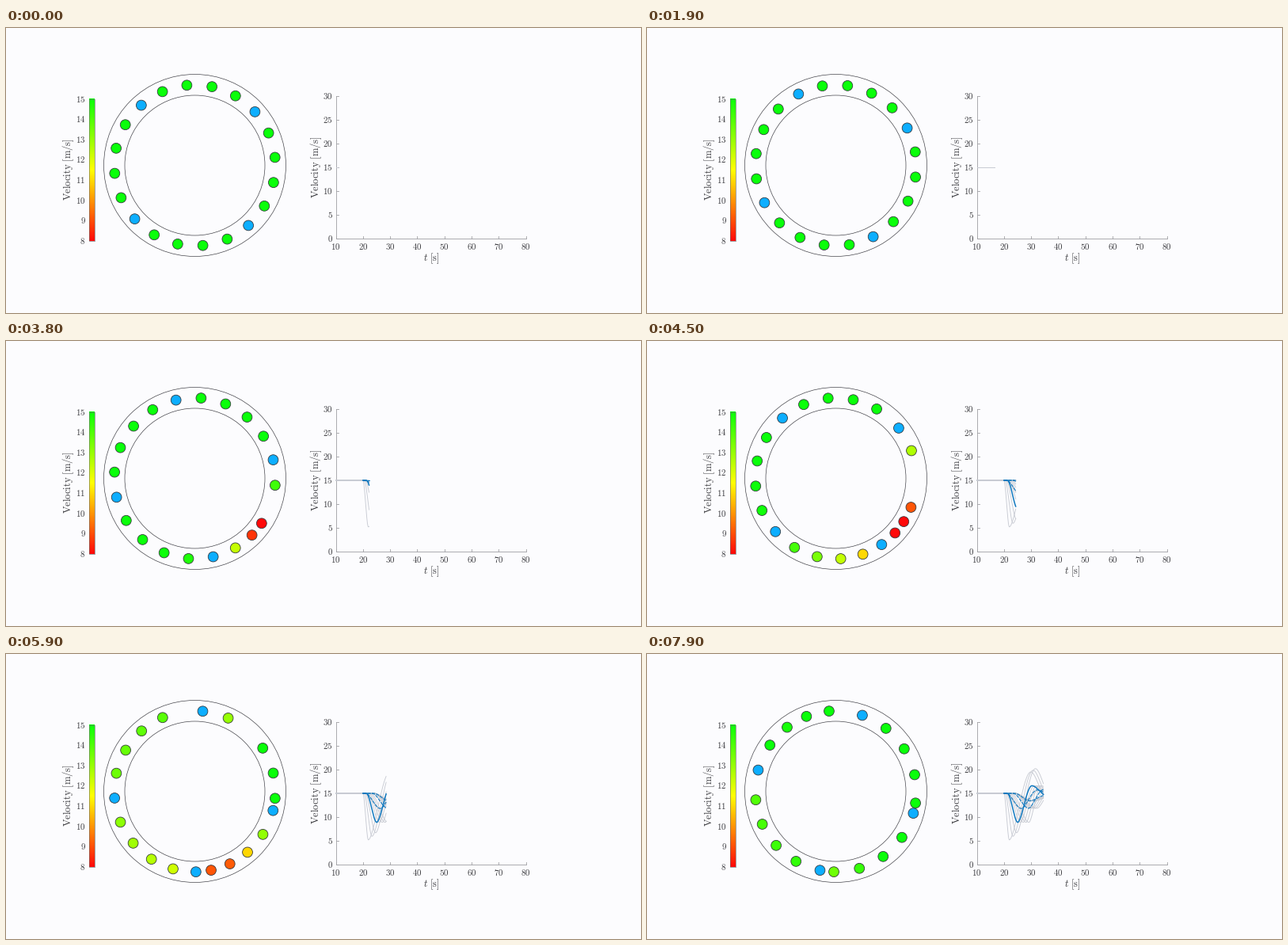
Animation of 802 by 360 pixels, one loop 8 s. Source, as a matplotlib script:

```python
import numpy as np
import matplotlib.pyplot as plt
from matplotlib.animation import FuncAnimation
from matplotlib.colors import LinearSegmentedColormap, Normalize
from matplotlib.patches import Circle, Rectangle

plt.rcParams["mathtext.fontset"] = "cm"

W, H, PX = 802, 360, 0.72          # PX: points per pixel at 100 dpi
FRAMES, STEP_MS = 80, 100
T_START, T_STEP, T_BRAKE = 10.9, 0.3, 20
N_CARS, GAP, CRUISE = 20, 18, 15.0
START_ANGLE, DEG_PER_M = -174.3, 13.32 / CRUISE
CX, CY, LANE = 238.5, 173.5, 101.7

INK, RING, AXIS = "#3c3c40", "#46464c", "#a4a4a8"
BLUE, BLUE_LINE, HUMAN_LINE = "#0daeff", "#0f78bf", "#c8cbd3"

# The wave loses strength at every robot, so each platoon shares one shape.
# first car: dip time, delay per car, dip speed, peak time, peak speed
PLATOONS = {
    -2: (26.4, 0.0, 11.8, 32.3, 15.7),
    0: (22.0, 1.35, 5.2, 29.9, 19.5),
    3: (25.1, 1.03, 8.9, 30.3, 16.6),
    8: (29.1, 0.77, 11.85, 34.6, 15.8),
    13: (29.5, 0.4, 13.4, 36.0, 14.7),
}
ROBOTS = (-2, 3, 8, 13)
CARS = range(-2, N_CARS - 2)       # car 0 brakes, positive numbers follow it

DT = 0.05
TIME = np.arange(10, 35, DT)


def ease(s):
    return s * s * (3 - 2 * s)


def speed(n):
    first = max(k for k in PLATOONS if k <= n)
    j = n - first
    dip_t, delay, dip, peak_t, peak = PLATOONS[first]
    if first == 0:                 # before any robot the extremes still shift
        dip, peak = dip + 0.75 * j, peak + 0.35 * j
    dip_t, peak_t = dip_t + delay * j, peak_t + 0.85 * j
    onset = min(T_BRAKE + 0.42 * abs(n), 24)

    def phase(a, b):
        return np.clip((TIME - a) / (b - a), 0, 1)

    fall = ease(phase(onset, dip_t))
    rise = ease(phase(dip_t, peak_t) ** 0.9)
    settle = ease(phase(peak_t, peak_t + 5.5))
    return CRUISE + (dip - CRUISE) * fall + (peak - dip) * rise + (14.5 - peak) * settle


speeds = {n: speed(n) for n in CARS}
angles = {}
for n in CARS:
    run = np.cumsum(speeds[n]) * DT * DEG_PER_M
    angles[n] = START_ANGLE - GAP * n + run - np.interp(T_START, TIME, run)


def car_xy(n, t):
    a = np.radians(np.interp(t, TIME, angles[n]))
    return CX + LANE * np.cos(a), CY - LANE * np.sin(a)


def chart_x(t):
    return 416.5 + (t - 10) * 240 / 70


def chart_y(v):
    return 266 - 6 * v


def scale_y(v):
    return 89.5 + (15 - v) * 179.5 / 7


fig = plt.figure(figsize=(W / 100, H / 100), dpi=100, facecolor="#fcfcfe")
ax = fig.add_axes([0, 0, 1, 1])


def label(x, y, s, size=11, ha="center", rot=0):
    ax.text(x, y, s, fontsize=size * PX, color=INK, ha=ha, va="center", rotation=rot)


def stroke(x, y, color=AXIS, width=0.9, **kw):
    return ax.plot(x, y, color=color, lw=width * PX, **kw)[0]


# colour scale
cmap = LinearSegmentedColormap.from_list("speed", ["#ff0a0a", "#ffff00", "#0aff0a"])
norm = Normalize(8, 15, clip=True)
top, bottom = scale_y(15), scale_y(8)
ax.imshow(np.linspace(1, 0, 180)[:, None], cmap=cmap, vmin=0, vmax=1,
          extent=(104.5, 111.5, bottom, top), aspect="auto", zorder=1)
ax.add_patch(Rectangle((104.5, top), 7, bottom - top, fill=False,
                       ec="#66666a", lw=0.6 * PX, zorder=2))
for v in range(8, 16):
    label(100.5, scale_y(v), f"${v}$", ha="right")
label(78.3, 178.5, r"$\mathrm{Velocity\ [m/s]}$", 12.7, rot=90)

# ring road
for r in (115, 88.5):
    ax.add_patch(Circle((CX, CY), r, fill=False, ec=RING, lw=0.7 * PX))

# chart frame
stroke([chart_x(10)] * 2, [chart_y(30), chart_y(0)])
stroke([chart_x(10), chart_x(80)], [chart_y(0)] * 2)
for v in range(0, 31, 5):
    stroke([chart_x(10), chart_x(10) + 3], [chart_y(v)] * 2)
    label(412.5, chart_y(v), f"${v}$", ha="right")
for t in range(10, 81, 10):
    stroke([chart_x(t)] * 2, [chart_y(0) - 3, chart_y(0)])
    label(chart_x(t), 276.5, f"${t}$")
label(391.3, 175.5, r"$\mathrm{Velocity\ [m/s]}$", 12.7, rot=90)
label(537, 291.7, r"$t\ \mathrm{[s]}$", 12.5)

lines, dots = {}, {}
for n in CARS:
    robot = n in ROBOTS
    if n == 3:
        style = dict(color=BLUE_LINE, width=1.5, zorder=4)
    elif robot:
        style = dict(color=BLUE_LINE, width=1.1, zorder=4, dashes=(4, 1))
    else:
        style = dict(color=HUMAN_LINE, width=0.9, zorder=3)
    lines[n] = stroke([], [], **style)
    dots[n] = ax.add_patch(Circle((0, 0), 6.4, ec="#30343a", lw=0.8 * PX, fc=BLUE,
                                  zorder=6 if robot else 5))

ax.set_xlim(0, W)
ax.set_ylim(H, 0)
ax.axis("off")


def update(frame):
    now = T_START + T_STEP * frame
    for n in CARS:
        v_now = np.interp(now, TIME, speeds[n])
        dots[n].center = car_xy(n, now)
        seen = TIME < now
        if n in ROBOTS:
            seen &= TIME > T_BRAKE
        else:
            dots[n].set_facecolor(cmap(norm(v_now)))
        lines[n].set_data(chart_x(TIME[seen]), chart_y(speeds[n][seen]))
    return [*lines.values(), *dots.values()]


anim = FuncAnimation(fig, update, frames=FRAMES, interval=STEP_MS, repeat=True, blit=False)
plt.show()
```
